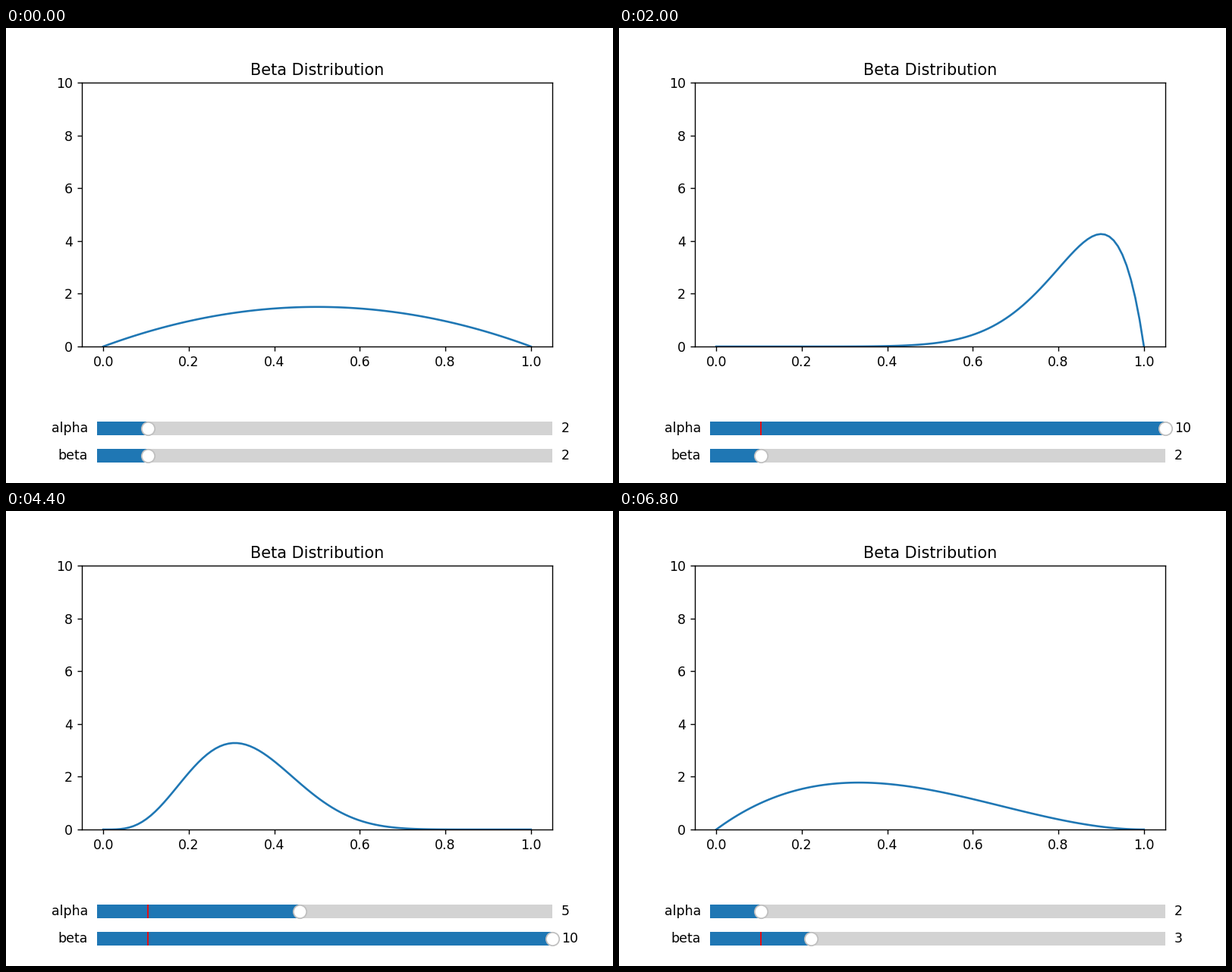
A matplotlib script for the animation above (7000 ms loop, 800 px wide and 600 px high).

```python
import math

import numpy as np
import matplotlib.pyplot as plt
from matplotlib.animation import FuncAnimation
from matplotlib.widgets import Slider

FRAME_MS = 200

# (alpha, beta) pairs: each parameter is swept up, then down
STEPS = (
    [(a, 2) for a in range(2, 11)]
    + [(10, b) for b in range(1, 11)]
    + [(a, 10) for a in range(8, 0, -1)]
    + [(2, b) for b in range(10, 2, -1)]
)

x = np.linspace(0, 1, 100)


def beta_pdf(a, b):
    scale = math.gamma(a + b) / (math.gamma(a) * math.gamma(b))
    return scale * x ** (a - 1) * (1 - x) ** (b - 1)


def add_slider(label, bottom):
    ax = fig.add_axes([0.15, bottom, 0.75, 0.06])
    slider = Slider(ax, label, 1, 10, valinit=2, valfmt="%d")
    slider.drawon = False
    return slider


fig, ax = plt.subplots(figsize=(6.4, 4.8), dpi=125)
fig.subplots_adjust(left=0.125, right=0.9, top=0.88, bottom=0.3)
curve, = ax.plot(x, beta_pdf(2, 2))
ax.set_ylim(0, 10)
ax.set_title("Beta Distribution")

alpha_slider = add_slider("alpha", 0.09)
beta_slider = add_slider("beta", 0.03)


def update(i):
    a, b = STEPS[i]
    alpha_slider.set_val(a)
    beta_slider.set_val(b)
    curve.set_ydata(beta_pdf(a, b))
    return [curve]


anim = FuncAnimation(fig, update, frames=len(STEPS), interval=FRAME_MS,
                     repeat=True, repeat_delay=0)
plt.show()
```
